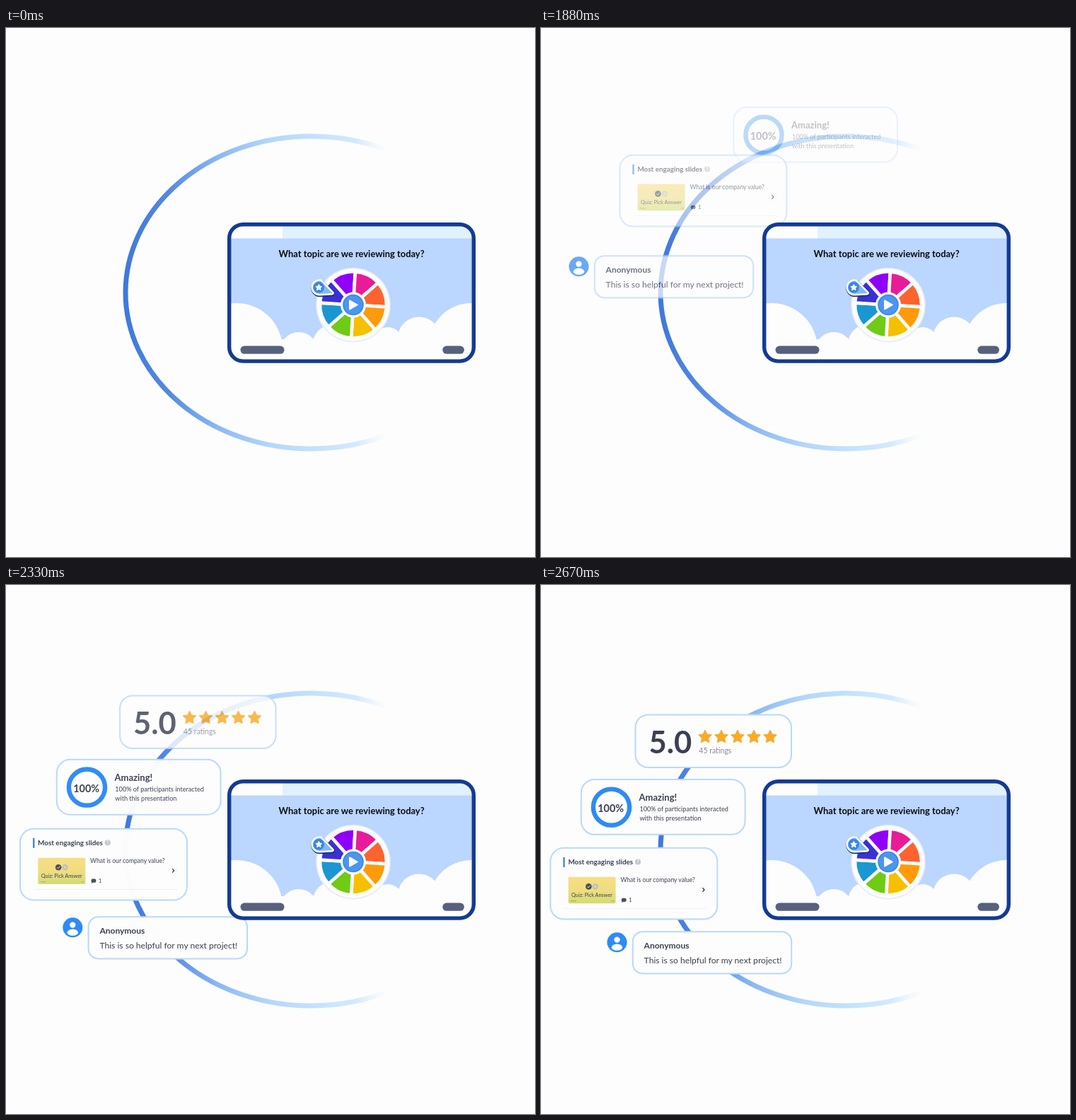
Write an HTML page that moves like this. It is 748 px wide and 748 px high and loops after 4 s.

```html
<!DOCTYPE html>
<html lang="en">
<head>
<meta charset="utf-8">
<title>Session feedback</title>
<style>
  html, body { margin: 0; width: 100%; height: 100%; overflow: hidden; background: #fdfdfd; }
  svg { display: block; width: 100%; height: 100%; }
  text { font-family: Lato, "Open Sans", sans-serif; fill: #3a4052; }
  .b { font-weight: 700; }
  .box { fill: #fdfdfd; stroke: #bad8fd; stroke-width: 2; }
  .mid { text-anchor: middle; }
  .blue { fill: #2e8af6; }
</style>
</head>
<body>
<svg viewBox="0 0 748 748">
  <defs>
    <linearGradient id="arc" gradientUnits="userSpaceOnUse" x1="166" y1="0" x2="540" y2="0">
      <stop offset="0" stop-color="#3f78dc"/>
      <stop offset=".17" stop-color="#5389e2"/>
      <stop offset=".36" stop-color="#8ab9f3"/>
      <stop offset=".55" stop-color="#b3d7fb"/>
      <stop offset=".75" stop-color="#c6e3fe"/>
      <stop offset=".88" stop-color="#d3e9fe"/>
      <stop offset="1" stop-color="#e4f2fe" stop-opacity="0"/>
    </linearGradient>
    <linearGradient id="thumb" x1="0" y1="0" x2="0" y2="1">
      <stop offset="0" stop-color="#f8dd85"/>
      <stop offset=".5" stop-color="#f0dd80"/>
      <stop offset="1" stop-color="#d2dc74"/>
    </linearGradient>
    <clipPath id="screen"><rect x="316" y="278" width="345" height="193" rx="19"/></clipPath>
    <clipPath id="face"><circle cx="107.5" cy="505.3" r="11.5"/></clipPath>
  </defs>

  <ellipse cx="431.5" cy="374" rx="262.5" ry="221" fill="none" stroke="url(#arc)" stroke-width="7"/>

  <g id="rating">
    <rect class="box" x="133.5" y="183.5" width="220.5" height="74.5" rx="18"/>
    <text class="b" x="152.5" y="237.5" font-size="43.5">5.0</text>
    <g id="stars" fill="#f9aa28" stroke="#f9aa28" stroke-width="1.4" stroke-linejoin="round"></g>
    <text x="223.3" y="237.5" font-size="10.5" style="fill:#878b94">45 ratings</text>
  </g>

  <g id="amazing">
    <rect class="box" x="56.8" y="275" width="231.8" height="77.8" rx="19"/>
    <circle cx="99.5" cy="314.2" r="25.6" fill="none" stroke="#2e8af6" stroke-width="6.4"/>
    <text class="b mid" x="98.7" y="321.3" font-size="14.4">100%</text>
    <text class="b" x="138.6" y="305" font-size="13">Amazing!</text>
    <text x="139.4" y="320.3" font-size="9.1">100% of participants interacted</text>
    <text x="139.4" y="332.7" font-size="9.1">with this presentation</text>
  </g>

  <g id="slides">
    <rect class="box" x="13.3" y="371.8" width="236" height="100.8" rx="19"/>
    <rect x="31.3" y="385" width="2.4" height="14" fill="#4187dc"/>
    <text class="b" x="38.4" y="395" font-size="9.9">Most engaging slides</text>
    <circle cx="137" cy="391.5" r="4.1" fill="#c3c7cd"/>
    <text class="b mid" x="137" y="394" font-size="6.5" style="fill:#fff">?</text>
    <path d="M33 457.5H235" stroke="#f0f1f3" stroke-width="1.2"/>
    <rect x="38.6" y="412.8" width="67" height="37.4" rx="2" fill="url(#thumb)"/>
    <path d="M42 446.8h8M99.5 446.8h4" stroke="#b3b178" stroke-width="1.4"/>
    <circle cx="67.4" cy="426.4" r="4.3" fill="#474d5b"/>
    <path d="M65.4 426.4l1.5 1.6 2.7-3.2" fill="none" stroke="#f6e6a6" stroke-width="1"/>
    <circle cx="76.8" cy="426.4" r="4.2" fill="#bfc1b4"/>
    <path d="M75.3 424.9l3 3m0-3l-3 3" stroke="#eeeede" stroke-width=".9"/>
    <text class="mid" x="72" y="441" font-size="7.3">Quiz: Pick Answer</text>
    <text x="112.4" y="420.4" font-size="8.6">What is our company value?</text>
    <path d="M115.5 442.7h3.4q1.8 0 1.8 2.6t-1.8 2.6h-2.4l-2.6 1.2.7-1.8q-.9-.7-.9-2 0-2.6 1.8-2.6z" fill="#474d5b"/>
    <text x="124" y="448.3" font-size="8">1</text>
    <circle cx="229.6" cy="431" r="6.5" fill="#f9f9fa"/>
    <path d="M228.4 428.3l2.6 2.7-2.6 2.7" fill="none" stroke="#333949" stroke-width="1.3"/>
  </g>

  <g id="comment">
    <circle class="blue" cx="107.5" cy="505.3" r="14"/>
    <g fill="#fff" clip-path="url(#face)">
      <circle cx="107.5" cy="501.6" r="4.2"/>
      <ellipse cx="107.5" cy="512.6" rx="7.8" ry="5.2"/>
    </g>
    <rect class="box" x="129.8" y="490.2" width="224.4" height="59.2" rx="14"/>
    <text class="b" x="145.6" y="514" font-size="12">Anonymous</text>
    <text x="145.6" y="535" font-size="12.1">This is so helpful for my next project!</text>
  </g>

  <g clip-path="url(#screen)">
    <rect x="313" y="275" width="351" height="199" fill="#bbd6ff"/>
    <rect x="313" y="275" width="78" height="22.5" fill="#fdfdfd"/>
    <rect x="391" y="275" width="273" height="22.5" fill="#e1f1fe"/>
    <g id="clouds" fill="#fdfdfd">
      <rect x="313" y="440" width="351" height="34"/>
      <rect x="460" y="425" width="80" height="20"/>
    </g>
    <g fill="#57617e">
      <rect x="331.5" y="449.5" width="62" height="11.3" rx="5.6"/>
      <rect x="617.3" y="449.5" width="30.6" height="11.3" rx="5.6"/>
    </g>
  </g>
  <rect x="315.7" y="277.7" width="345.6" height="193.4" rx="19.5" fill="none" stroke="#143b92" stroke-width="5.4"/>
  <text class="b mid" x="488.6" y="324" font-size="12.9" style="fill:#0b0b0e">What topic are we reviewing today?</text>

  <circle cx="491" cy="391.7" r="52.8" fill="#e9eef7"/>
  <circle cx="491" cy="391.5" r="51" fill="#fdfdfd"/>
  <g id="wheel" stroke="#fdfdfd" stroke-width="4.6"></g>
  <circle cx="491" cy="391.5" r="18" fill="#fdfdfd"/>
  <circle cx="491" cy="391.5" r="14" fill="#4a96f0" stroke="#3f86df" stroke-width="1.6"/>
  <path d="M486 385.4v12.2l10.8-6.1z" fill="#fff" stroke="#fff" stroke-width="2" stroke-linejoin="round"/>

  <g stroke-linejoin="round">
    <path id="rim" fill="#1d3566" stroke="#1d3566" stroke-width="3.6" transform="translate(.5 1.2)"/>
    <path id="pin" fill="#7ebaf7" stroke="#fff" stroke-width="2.4"/>
    <circle cx="442.3" cy="366.8" r="7.7" fill="#3a86e2"/>
    <path id="badge" fill="#fff" stroke="#fff"/>
  </g>
</svg>
<script>
const $ = id => document.getElementById(id);
const rad = d => d * Math.PI / 180;

function add(parent, tag, attrs) {
  const el = document.createElementNS("http://www.w3.org/2000/svg", tag);
  for (const a in attrs) el.setAttribute(a, attrs[a]);
  $(parent).append(el);
}

function star(x, y, r) {
  const pts = [];
  for (let i = 0; i < 10; i++) {
    const a = rad(i * 36 - 90), q = i % 2 ? r * 0.5 : r;
    pts.push((x + q * Math.cos(a)).toFixed(2) + " " + (y + q * Math.sin(a)).toFixed(2));
  }
  return "M" + pts.join("L") + "Z";
}

for (let i = 0; i < 5; i++) add("stars", "path", { d: star(232 + 23 * i, 214.9, 9.3) });
$("badge").setAttribute("d", star(442.3, 367, 4.6));

const drop = "M446 356.8A10.4 10.4 0 1 0 443.5 377.2L461 376.2Q464 375.8 462 373.6Z";
$("rim").setAttribute("d", drop);
$("pin").setAttribute("d", drop);

[[326, 454, 65], [414, 457, 27], [462, 447, 28], [540, 443, 20], [584, 438.5, 30], [658, 449, 60]]
  .forEach(([cx, cy, r]) => add("clouds", "circle", { cx, cy, r }));

["#9000f8", "#e81c98", "#fd632f", "#ff9a0a", "#f6c000", "#6fcb14", "#1a97d2", "#3b30d8"]
  .forEach((fill, i) => {
    const p = a => (491 + 47 * Math.cos(rad(a))) + " " + (391.5 + 47 * Math.sin(rad(a)));
    const a = -131.5 + 45 * i;
    add("wheel", "path", { fill, d: `M491 391.5L${p(a)}A47 47 0 0 1 ${p(a + 45)}Z` });
  });

// Steps: [tick, dx, dy, opacity], offsets from the resting place.
const END = [28, 0, 0, 1];
const moves = {
  rating: [[11, 262, -58, 0], [13, 175, -67, .22], [17, 66.5, -45.5, .57], [23, 10.5, -11, .98], END],
  amazing: [[6, 382, -136, 0], [7, 323, -156, .1], [9, 215.5, -163, .31], [13, 85, -106, .6],
    [17, 34, -54, .89], [23, 6, -11.5, 1], END],
  slides: [[2, 434, -238, 0], [5, 254, -266, .22], [7, 163, -237, .39], [9, 98, -192, .54],
    [13, 38.5, -108, .78], [17, 15.5, -53, .95], [23, 2.5, -11.3, 1], END],
  comment: [[0, 300, -359, .13], [2, 161, -368, .28], [5, 14, -298, .49], [9, -54, -168, .72],
    [13, -43, -88, .88], [17, -24, -42, .97], [23, -5.5, -8.5, 1], END]
};

// Slope of column c at knot i for a smooth curve through the steps.
function slope(s, i, c) {
  const d = j => (s[j + 1][c] - s[j][c]) / (s[j + 1][0] - s[j][0]);
  if (i === s.length - 1) return 0;
  if (i === 0) return d(0);
  const h1 = s[i][0] - s[i - 1][0], h2 = s[i + 1][0] - s[i][0];
  return (d(i - 1) * h2 + d(i) * h1) / (h1 + h2);
}

function at(s, k, c) {
  let i = 0;
  while (i < s.length - 2 && k >= s[i + 1][0]) i++;
  const h = s[i + 1][0] - s[i][0], u = (k - s[i][0]) / h, v = 1 - u;
  return s[i][c] * (1 + 2 * u) * v * v + s[i + 1][c] * u * u * (3 - 2 * u)
    + h * u * v * (slope(s, i, c) * v - slope(s, i + 1, c) * u);
}

// 24 ticks a second, on a 10 ms clock.
function tick(t) {
  const n = Math.floor((t - 1500) / 10 + 1e-6);
  return Math.min(28, Math.ceil((n + .5) * .24 - 1e-6) - 1);
}

function draw() {
  const k = tick(performance.now() % 4000);
  for (const id in moves) {
    const s = moves[id], el = $(id);
    const shown = k >= 0 && k >= s[0][0];
    el.setAttribute("visibility", shown ? "visible" : "hidden");
    if (!shown) continue;
    el.setAttribute("transform", `translate(${at(s, k, 1).toFixed(2)} ${at(s, k, 2).toFixed(2)})`);
    el.setAttribute("opacity", Math.max(0, Math.min(1, at(s, k, 3))).toFixed(3));
  }
  requestAnimationFrame(draw);
}
draw();
</script>
</body>
</html>
```
